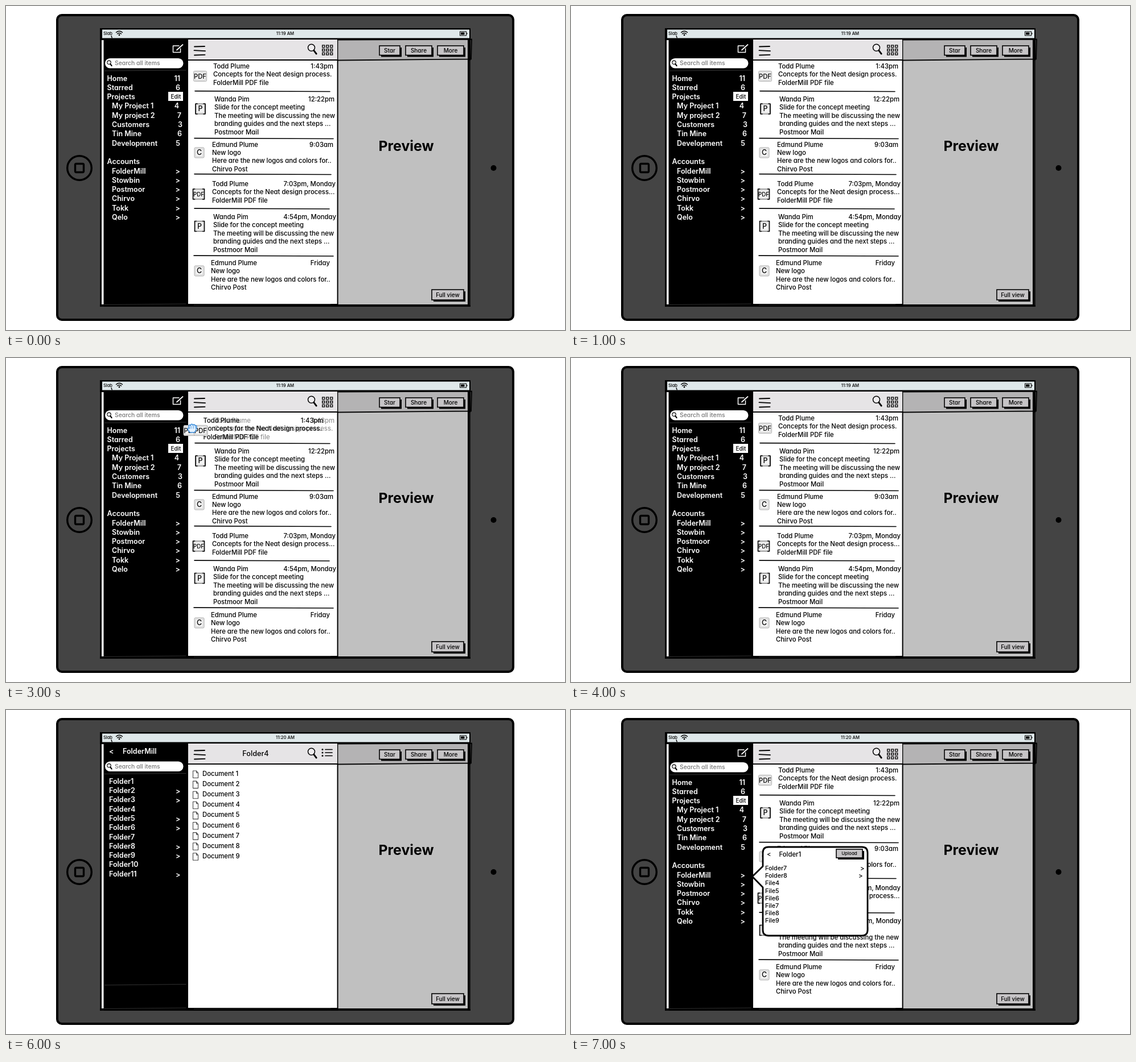
Recreate the animation shown at these times as an HTML page. Size 982x570 px, loop 8000 ms.

```html
<!DOCTYPE html>
<html lang="en">
<head>
<meta charset="utf-8">
<title>Tablet wireframe</title>
<style>
  html, body { margin: 0; width: 100%; height: 100%; overflow: hidden; background: #fff; }
  svg { display: block; width: 100vw; height: 100vh; }
  text { font-family: Inter, Lato, sans-serif; font-weight: 500; font-feature-settings: "cv11"; white-space: pre; }
  .bold { font-weight: 600; }
  .heavy { font-weight: 700; }
</style>
</head>
<body>
<svg id="stage" viewBox="0 0 982 570"></svg>
<script>
// Drawing helpers: each returns SVG markup.
const text = (x, y, s, size = 11.3, fill = '#000', anchor = 'start', cls = '') =>
  `<text x="${x}" y="${y}" font-size="${size}" fill="${fill}" text-anchor="${anchor}" class="${cls}">${
    String(s).replace(/&/g, '&amp;').replace(/</g, '&lt;')}</text>`;
const rect = (x, y, w, h, fill = 'none', stroke = 'none', sw = 0, rx = 0) =>
  `<rect x="${x}" y="${y}" width="${w}" height="${h}" rx="${rx}" fill="${fill}" stroke="${stroke}" stroke-width="${sw}"/>`;
const circle = (x, y, r, fill = 'none', stroke = 'none', sw = 0) =>
  `<circle cx="${x}" cy="${y}" r="${r}" fill="${fill}" stroke="${stroke}" stroke-width="${sw}"/>`;
const path = (d, stroke = '#000', sw = 1.6, fill = 'none') =>
  `<path d="${d}" fill="${fill}" stroke="${stroke}" stroke-width="${sw}" stroke-linecap="round" stroke-linejoin="round"/>`;
const group = (id, ...parts) => `<g id="${id}">${parts.flat(9).join('')}</g>`;
const moved = (dx, dy, body, opacity = 1) =>
  `<g transform="translate(${dx} ${dy})" opacity="${opacity}">${body}</g>`;

const sideText = (x, y, s, anchor = 'start') => text(x, y + 4.5, s, 12.5, '#fff', anchor, 'bold');
const button = (x, y, w, h, label, size = 10) =>
  rect(x + 3, y + 3, w, h, '#000') + rect(x, y, w, h, '#c6c4c6', '#000', 1.6) +
  text(x + w / 2, y + h / 2 + size * .36, label, size, '#000', 'middle');
const lens = (x, y, r, sw, fill = '#fff') =>
  circle(x, y, r, fill, '#000', sw) +
  path(`M${x + r * .7} ${y + r * .8}l${r * .75} ${r}`, '#000', sw * 1.9);

function device() {
  return group('device',
    rect(90, 16, 801, 536, '#444', '#000', 4, 8),
    circle(129, 285, 21.3, 'none', '#000', 3.4), rect(121.5, 277.5, 15, 15, 'none', '#000', 3.4, 2),
    circle(856.5, 285, 5, '#000'),
    rect(165, 39, 651, 490, '#000'),
    rect(169, 41.5, 645, 15, '#dfe8ea'),
    rect(168, 60, 3.5, 465, '#fff'),
    text(171, 51, 'Slab', 7.5), path('M185 52.5l1.2 3.5', '#000', 1.3),
    path('M193.5 46.5q5.5-4.5 11 0M195.5 49q3.5-3 7 0', '#000', 1.4), circle(199, 51, 1.4, '#000'),
    rect(797.5, 45, 11, 7, 'none', '#000', 1), rect(799, 46.5, 6.5, 4, '#000'), path('M810 47.5v2', '#000', 1),
    rect(320, 59, 262, 35.5, '#e6e4e6'),
    rect(320, 96, 261.6, 428, '#fff'),
    rect(583.6, 59, 227.4, 466, '#c0c0c0'), rect(583.6, 59, 227.4, 35, '#b4b3b4'),
    path('M320 95.2L582 94.8', '#000', 1.8),
    path('M583 59.5L818 58.5L817 93.5L583 95.5', '#000', 1.8),
    path('M815 96V526', '#444', .7), path('M173 525.5L316 524M330 526L570 524.8', '#3a3a3a', .8),
    path('M331 71.5L349 71M330.5 78.2L350 79.2M331 86.5L349.5 85.8', '#000', 1.8),
    lens(536.5, 73.3, 6, 1.5, '#efedef'),
    button(656, 70, 36, 16.5, 'Star'), button(702, 70, 46, 16.5, 'Share'), button(758, 70, 46, 16.5, 'More'),
    button(748, 499, 56, 18, 'Full view'),
    text(703, 255, 'Preview', 24.8, '#000', 'middle', 'heavy'));
}

const searchPill = y =>
  rect(174, y, 137.5, 17.5, '#fff', 'none', 0, 8.7) + lens(181, y + 7.3, 3.2, 1.1) +
  text(191, y + 12, 'Search all items', 10.4, '#777') + path(`M173 ${y + 22}L316 ${y + 21}`, '#333', 1);

function homeSidebar() {
  const counts = [
    [177.5, 'Home', 306, 11], [177.5, 'Starred', 306, 6], [177.5, 'Projects'],
    [186, 'My Project 1', 304, 4], [186, 'My project 2', 308, 7], [186, 'Customers', 310, 3],
    [186, 'Tin Mine', 309, 6], [186, 'Development', 306, 5]];
  const accounts = ['FolderMill', 'Stowbin', 'Postmoor', 'Chirvo', 'Tokk', 'Qelo'];
  return [
    path('M304 70H293.5V81.5H306.5V75', '#fff', 1.5), path('M300 77.5L310.5 68', '#fff', 1.8),
    searchPill(92),
    counts.map(([x, label, right, n], i) =>
      sideText(x, 127 + i * 16.3, label) + (n ? sideText(right, 127 + i * 16.3, n, 'end') : '')),
    rect(285, 151, 26, 16, '#fff'), text(298.5, 162.8, 'Edit', 9.8, '#000', 'middle'),
    sideText(177.5, 273.7, 'Accounts'),
    accounts.map((name, i) => sideText(186, 290 + i * 16.3, name) + sideText(306, 290 + i * 16.3, '>', 'end'))];
}

// Icon box; a strong one has dark sides.
function badge(x, y, label, strong, w = 17) {
  const left = x - w / 2, right = x + w / 2;
  return rect(left, y - 9, w, 18, '#f4f4f4', strong ? '#555' : '#aaa', 1, 2) +
    rect(left + 2, y - 7, w - 4, 14, 'none', '#bbb', .7) +
    (strong ? path(`M${left + 3} ${y - 9}h-3v18h3M${right - 3} ${y - 9}h3v18h-3`, '#000', 1.6) : '') +
    text(x, y + 4.3, label, label.length > 1 ? w * .49 : 12.5, '#000', 'middle');
}

// Message kinds: icon, sender and body lines.
const pdf = ['PDF', 'Todd Plume', 'Concepts for the Neat design process.', 'FolderMill PDF file'];
const pdfLong = pdf.map(s => s.replace('process.', 'process...'));
const mail = ['P', 'Wanda Pim', 'Slide for the concept meeting', 'The meeting will be discussing the new',
  'branding guides and the next steps ...', 'Postmoor Mail'];
const post = ['C', 'Edmund Plume', 'New logo', 'Here are the new logos and colors for..', 'Chirvo Post'];

function message([label, ...lines], x, y, time, right, iconX, iconY, strong, iconW) {
  return badge(iconX, iconY, label, strong, iconW) +
    lines.map((s, i) => text(x, y + 4 + i * 14.45, s)).join('') +
    text(right, y + 4, time, 11.3, '#000', 'end');
}
const firstMessage = message(pdf, 364, 106, '1:43pm', 575, 341, 123.5, false, 23);
const rule = (y, x1, x2) => path(`M${x1} ${y - .4}L${x2} ${y + .5}`, '#000', 1.6);

function inbox() {
  const dots = [0, 1, 2].map(r => [0, 1, 2].map(c =>
    rect(555.7 + c * 7, 69 + r * 6.6, 4, 3.8, 'none', '#000', 1.3)));
  return group('inbox', homeSidebar(), dots,
    message(mail, 366, 164, '12:22pm', 577, 341.5, 181, true),
    message(post, 362, 243.5, '9:03am', 575, 339.5, 258),
    message(pdfLong, 362, 313, '7:03pm, Monday', 579, 338.5, 331, true, 20),
    message(mail, 364, 371, '4:54pm, Monday', 580, 340, 387.5, true),
    message(post, 360, 452, 'Friday', 569, 339.5, 466),
    rule(150, 332, 569), rule(233, 331, 575), rule(296, 331, 571), rule(356.5, 331, 568), rule(439.5, 330, 575));
}

function drag() {
  const hand = 'M323 131l-4-6q0-3 3-1l-1-5q2-3 3 0l1-2q2-2 3 1l2-1q2 0 2 2q3-1 3 2q0 6-4 10z';
  return group('drag', moved(2, 4, firstMessage, .42), moved(-17.5, 4, firstMessage),
    badge(342, 127.5, 'PDF', false, 23), path(hand, '#3f8fdc', 1.5, '#e4f2ff'),
    path('M325 124v-4M329 124v-5M333 124v-4', '#3f8fdc', 1));
}

function search() {
  const labels = [['Top hit', 182], ['Folders', 222], ['PDF files', 248.5], ['Images', 288.5], ['Mail & Messages', 342]];
  const hits = [[179, 'File1', 'Message1'], [218.5, 'Folder1'], [245, 'PDF file1', 'PDF file2'],
    [285, 'Image1', 'Image2', 'Image3'], [338.3, 'Mail1', 'Tokk Message', 'Chirvo message']];
  return group('search',
    rect(304, 114, 374, 319.5, '#fff', '#000', 2), rect(305, 115, 372, 21, '#cfccd0'),
    path('M304 136.5H678M304 163L678 162.4', '#000', 1.6),
    text(484.5, 130, 'Search', 10.6, '#000', 'middle'),
    rect(385.5, 140.5, 229, 19, '#fff', '#000', 2, 9.5), lens(394, 148.5, 3.3, 1.1),
    text(403, 153, 'Logos', 10.6, '#777'),
    labels.map(([s, y]) => text(316, y + 4, s, 10.7, '#929292')),
    hits.map(([y, ...names]) => names.map((s, i) => text(446, y + 4 + i * 13.3, s, 10.6))));
}

function swipe() {
  const star = Array.from({ length: 10 }, (_, i) => {
    const a = i * Math.PI / 5 - Math.PI / 2, r = i % 2 ? 6.5 : 12.5;
    return `${i ? 'L' : 'M'}${502 + r * Math.cos(a)} ${265 + r * Math.sin(a)}`;
  }).join('') + 'z';
  return group('swipe', rect(419.5, 232.5, 162.5, 62.5, '#000'),
    [442.5, 452.5, 462.3].map(x => circle(x, 268.3, 3.3, '#fff')),
    path(star, '#fff', 1, '#fff'),
    path('M556 259H543.5V272H562V266', '#fff', 2), path('M553 266L565 257.5', '#fff', 2.4),
    path('M560.5 255.5H568L566 262z', '#fff', 1, '#fff'));
}

function files() {
  const hasChildren = [2, 3, 5, 6, 8, 9, 11];
  const range = n => Array.from({ length: n }, (_, i) => i + 1);
  return group('files',
    sideText(181, 72, '<'), sideText(205, 72.5, 'FolderMill'), searchPill(90.5),
    range(11).map(n => {
      const y = 125.2 + (n - 1) * 16.3;
      return sideText(181, y, 'Folder' + n) + (hasChildren.includes(n) ? sideText(306.5, y + 1, '>', 'end') : '');
    }),
    path('M173 484L316 482.5', '#333', 1),
    text(438.5, 81, 'Folder4', 12.7, '#000', 'middle'),
    [69.5, 75, 80.5].map(y => circle(556, y, 1.5, '#000') + path(`M561 ${y}h12`, '#000', 1.7)),
    range(9).map(n => {
      const y = 112 + (n - 1) * 18.1;
      return path(`M328.5 ${y - 5}h6l3 3.5v9h-9zM334.5 ${y - 5}v3.5h3`, '#444', 1.1, '#fff') +
        text(345, y + 4, 'Document ' + n);
    }));
}

function popover() {
  const names = ['Folder7', 'Folder8', 'File4', 'File5', 'File6', 'File7', 'File8', 'File9'];
  return group('popover',
    path('M347 241H511q10 0 10 10V387q0 10-10 10H347q-10 0-10-10V312L318.5 293L337 275V251q0-10 10-10z', '#000', 2.8, '#fff'),
    text(344, 258, '<'), text(365.5, 258, 'Folder1'),
    button(466, 245, 46, 15, 'Upload', 8),
    names.map((s, i) => text(341, 282 + i * 13.2, s, 10.7)),
    text(508, 283, '>'), text(505, 295.5, '>'));
}

const stage = document.getElementById('stage');
stage.innerHTML = device() + inbox() + group('first', firstMessage) + search() + drag() + swipe() + files() + popover() +
  '<g id="clock"></g>';

const layers = ['inbox', 'first', 'search', 'drag', 'swipe', 'files', 'popover'];
const home = ['inbox', 'first'];
const scenes = [home, home, [...home, 'search'], ['inbox', 'drag'],
  home, [...home, 'swipe'], ['files'], [...home, 'popover']];
const get = id => document.getElementById(id);
const start = performance.now();
let shown = -1;

function tick() {
  const scene = Math.floor((performance.now() - start) / 1000) % scenes.length;
  if (scene !== shown) {
    shown = scene;
    layers.forEach(id => get(id).style.display = scenes[scene].includes(id) ? '' : 'none');
    get('clock').innerHTML = text(490.5, 51, scene < 6 ? '11:19 AM' : '11:20 AM', 7.7, '#000', 'middle');
  }
  requestAnimationFrame(tick);
}
tick();
</script>
</body>
</html>
```
